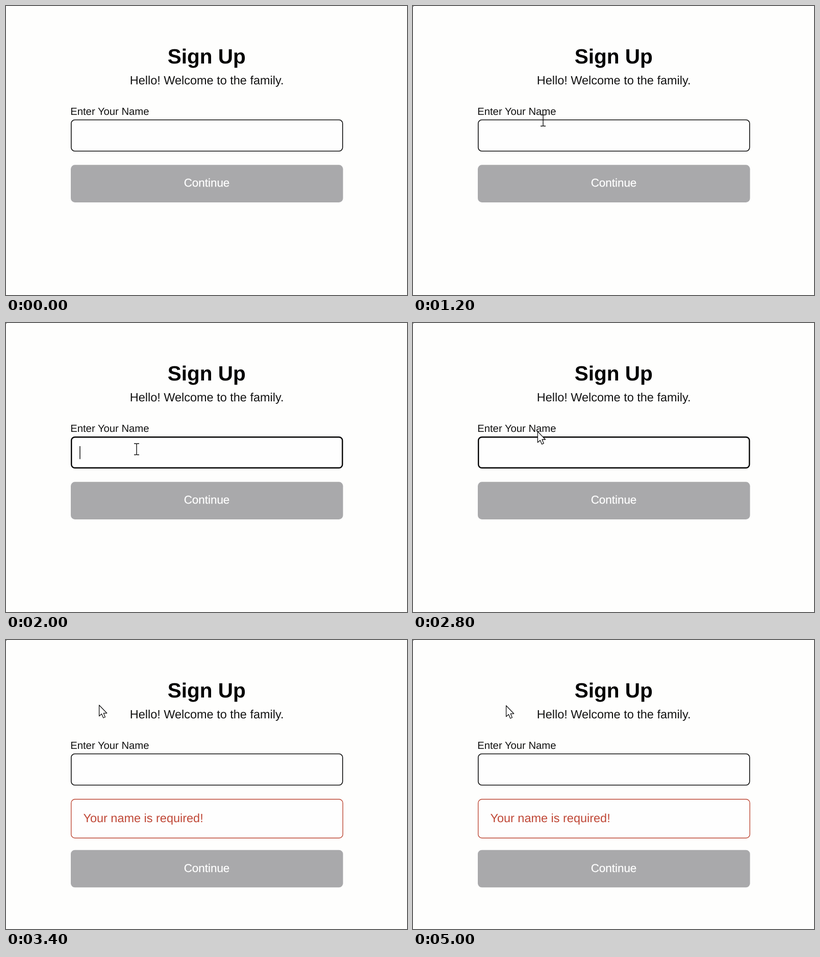
Animation of 786 by 568 pixels, one loop 5400 ms. Source, as an HTML page:

```html
<!DOCTYPE html>
<html lang="en">
<head>
<meta charset="utf-8">
<title>Sign up form</title>
<style>
  html, body { margin: 0; width: 100%; height: 100%; overflow: hidden; background: #fefefd; }
  svg { display: block; width: 786px; height: 568px; }
  text { font-family: "Liberation Sans", Arial, sans-serif; text-rendering: geometricPrecision; }
  .mid { text-anchor: middle; }
</style>
</head>
<body>
<svg viewBox="0 0 786 568">
  <rect width="786" height="568" fill="#fefefd"/>
  <rect id="dot" width="1" height="1"/>

  <text class="mid" x="393.3" y="113" font-size="40.53" font-weight="700">Sign Up</text>
  <text class="mid" x="393.6" y="154" font-size="23.47" fill="#111">Hello! Welcome to the family.</text>
  <text x="126.2" y="214" font-size="20.27" fill="#111">Enter Your Name</text>

  <rect id="field" fill="#fefefe" stroke="#111"/>
  <rect id="caret" x="144.2" y="242" width="1.5" height="25.5" fill="#111"/>

  <g id="error">
    <rect x="127.7" y="313" width="532.6" height="76.3" rx="7.5" fill="#fefefe" stroke="#bd4a37" stroke-width="1.4"/>
    <text x="151.4" y="357.5" font-size="23.47" fill="#bf4635">Your name is required!</text>
  </g>

  <g id="button">
    <rect x="127" y="312.3" width="533.6" height="73.6" rx="8" fill="#a9a9ab"/>
    <text class="mid" x="393.5" y="355.3" font-size="22.4" fill="#fff" stroke="#fff" stroke-width=".25">Continue</text>
  </g>

  <g id="beam" fill="none" stroke="#111" stroke-width="1.4">
    <path d="M-5-11H-1.5Q0-11 0-9.5Q0-11 1.5-11H5M0-10V10M-5 11H-1.5Q0 11 0 9.5Q0 11 1.5 11H5"/>
  </g>
  <path id="arrow" d="M0 0V21.6L4.9 17.2L8.2 25L11.8 23.5L8.6 15.8H15.1Z" fill="#fff" stroke="#111" stroke-width="1.3" stroke-linejoin="round"/>
</svg>
<script>
  const LOOP = 5400;
  const FOCUS = 2000, BLUR = 3400;
  const $ = id => document.getElementById(id);

  // Pointer positions, each held until the next: [time, shape, x, y]
  const pointer = [
    [0, "", 0, 0],
    [1200, "beam", 255, 225],
    [1600, "beam", 256, 230],
    [1800, "beam", 256, 248],
    [2800, "arrow", 244.4, 213.2],
    [3000, "arrow", 226.4, 182.2],
    [3200, "arrow", 184.4, 130.6],
    [3400, "arrow", 182.6, 128],
    [3600, "arrow", 182.6, 129]
  ];

  const show = (id, on) => $(id).setAttribute("visibility", on ? "visible" : "hidden");
  const within = (t, a, b) => t >= a && t < b;

  function setField(focused) {
    const w = focused ? 2.4 : 1.6;
    const box = {
      x: 127 + w / 2, y: 223 + w / 2,
      width: 533.6 - w, height: 63 - w,
      rx: 8 - w / 2, "stroke-width": w,
      stroke: focused ? "#000" : "#111"
    };
    for (const key in box) $("field").setAttribute(key, box[key]);
  }

  function draw(t) {
    const [, shape, x, y] = pointer.filter(p => p[0] <= t).pop();
    for (const id of ["beam", "arrow"]) {
      show(id, id === shape);
      $(id).setAttribute("transform", `translate(${x} ${y})`);
    }
    const failed = t >= BLUR;
    show("dot", t >= 1000);
    show("caret", within(t, FOCUS, 2400) || within(t, 3200, BLUR));
    show("error", failed);
    $("button").setAttribute("transform", `translate(0 ${failed ? 100.4 : 0})`);
    setField(within(t, FOCUS, BLUR));
  }

  const start = performance.now();
  function tick() {
    draw((performance.now() - start) % LOOP);
    requestAnimationFrame(tick);
  }
  tick();
</script>
</body>
</html>
```
